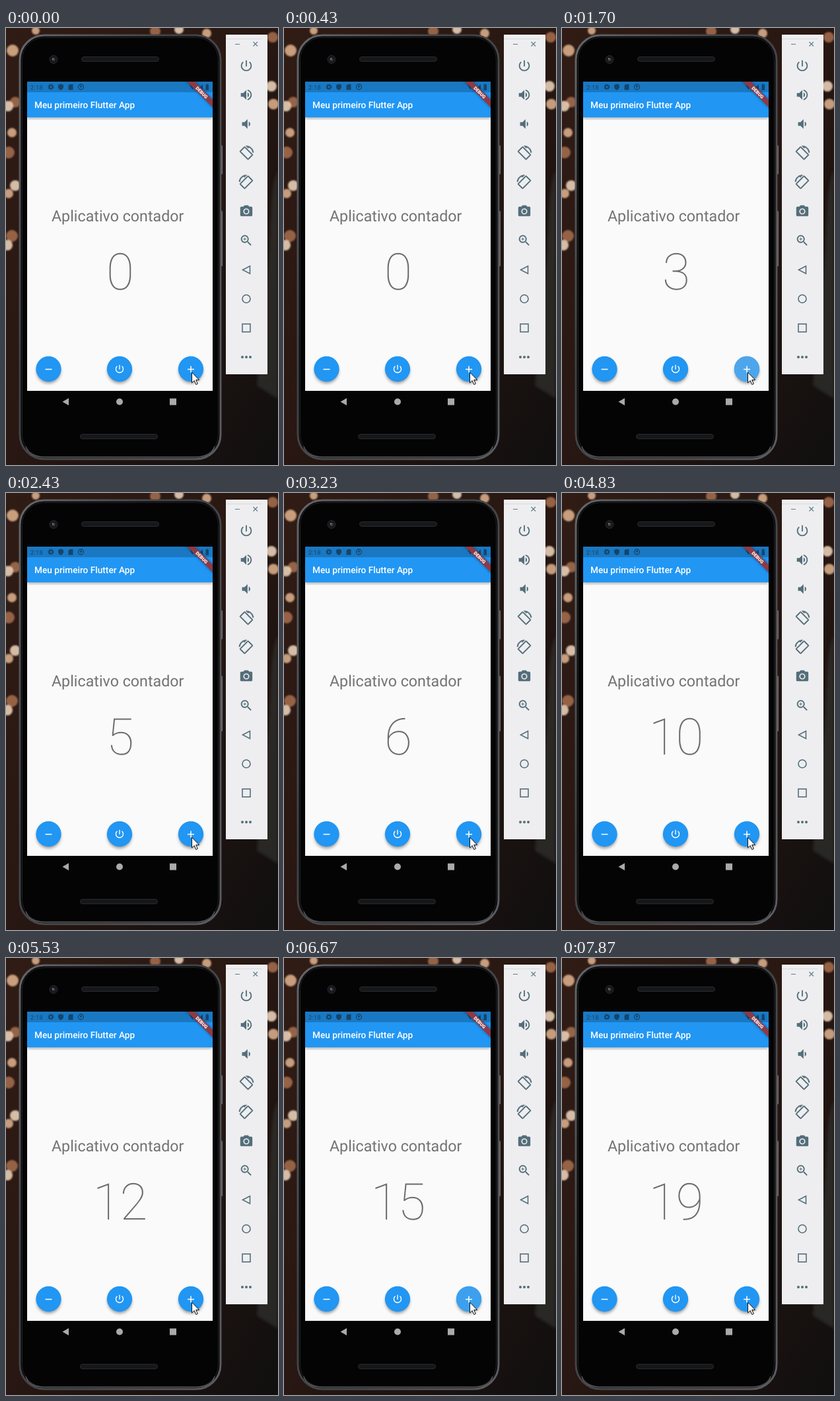
These frames come from a looping animation (412x660 px, 8 s). An HTML page:

```html
<!DOCTYPE html>
<html lang="pt">
<head>
<meta charset="utf-8">
<style>
  html, body { margin: 0; width: 100%; height: 100%; overflow: hidden; background: #16100e; }
  svg { display: block; width: 412px; height: 660px; font-family: Roboto, sans-serif; }
  text { text-rendering: geometricPrecision; }
</style>
</head>
<body>
<svg viewBox="0 0 412 660">
  <defs>
    <filter id="blur" x="-50%" y="-50%" width="200%" height="200%"><feGaussianBlur stdDeviation="2"/></filter>
    <filter id="soft" x="-50%" y="-50%" width="200%" height="200%"><feGaussianBlur stdDeviation="1.2"/></filter>
    <linearGradient id="rim" x2="1" y2="1">
      <stop offset="0" stop-color="#66676b"/><stop offset=".4" stop-color="#3f4044"/><stop offset="1" stop-color="#5c5d61"/>
    </linearGradient>
    <linearGradient id="night" x2="1" y2="1">
      <stop offset="0" stop-color="#301c15"/><stop offset=".5" stop-color="#281712"/><stop offset="1" stop-color="#100f0f"/>
    </linearGradient>
    <clipPath id="screen"><rect x="32" y="81" width="281" height="467"/></clipPath>
    <path id="power" d="M13 3h-2v10h2V3zm4.83 2.17l-1.42 1.42C17.99 7.86 19 9.81 19 12c0 3.87-3.13 7-7 7s-7-3.13-7-7c0-2.19 1.01-4.14 2.58-5.42L6.17 5.17C4.23 6.82 3 9.26 3 12c0 4.97 4.03 9 9 9s9-4.03 9-9c0-2.74-1.23-5.18-3.17-6.83z"/>
    <path id="loud" d="M3 9v6h4l5 5V4L7 9H3zm13.5 3c0-1.77-1.02-3.29-2.5-4.03v8.05c1.48-.73 2.5-2.25 2.5-4.02zM14 3.23v2.06c2.89.86 5 3.54 5 6.71s-2.11 5.85-5 6.71v2.06c4.01-.91 7-4.49 7-8.77s-2.99-7.86-7-8.77z"/>
    <path id="quiet" d="M18.5 12c0-1.77-1.02-3.29-2.5-4.03v8.05c1.48-.73 2.5-2.25 2.5-4.02zM5 9v6h4l5 5V4L9 9H5z"/>
    <path id="turn" stroke="#546e7a" stroke-width=".8" d="M16.48 2.52c3.27 1.55 5.61 4.72 5.97 8.48h1.5C23.44 4.84 18.29 0 12 0l-.66.03 3.81 3.81 1.33-1.32zM10.23 1.75c-.59-.59-1.54-.59-2.12 0L1.75 8.11c-.59.59-.59 1.54 0 2.12l12.02 12.02c.59.59 1.54.59 2.12 0l6.36-6.36c.59-.59.59-1.54 0-2.12L10.23 1.75zm4.6 19.44L2.81 9.17l6.36-6.36 12.02 12.02-6.36 6.36z"/>
    <path id="camera" fill-rule="evenodd" d="M9 2L7.17 4H4c-1.1 0-2 .9-2 2v12c0 1.1.9 2 2 2h16c1.1 0 2-.9 2-2V6c0-1.1-.9-2-2-2h-3.17L15 2H9zm3 15a5 5 0 1 1 0-10a5 5 0 1 1 0 10zm0-1.8a3.2 3.2 0 1 0 0-6.4a3.2 3.2 0 1 0 0 6.4z"/>
    <path id="zoom" d="M15.5 14h-.79l-.28-.27C15.41 12.59 16 11.11 16 9.5 16 5.91 13.09 3 9.5 3S3 5.91 3 9.5 5.91 16 9.5 16c1.61 0 3.09-.59 4.23-1.57l.27.28v.79l5 4.99L20.49 19l-4.99-5zm-6 0C7.01 14 5 11.99 5 9.5S7.01 5 9.5 5 14 7.01 14 9.5 11.99 14 9.5 14zm2.5-4h-2v2H9v-2H7V9h2V7h1v2h2v1z"/>
  </defs>

  <rect width="412" height="660" fill="url(#night)"/>
  <g id="lights" filter="url(#soft)"></g>
  <path d="M412 215C396 245 404 330 392 400L380 540L412 560Z" fill="#33302f" opacity=".7" filter="url(#blur)"/>

  <!-- phone -->
  <g fill="#6f7074">
    <rect x="324" y="177" width="4" height="44" rx="1.5"/><rect x="324" y="276" width="4" height="84" rx="1.5"/>
  </g>
  <rect x="21" y="11" width="304" height="640" rx="37" fill="#070708" stroke="url(#rim)" stroke-width="3"/>
  <rect x="24.500" y="14.500" width="297" height="633" rx="33" fill="#040405" stroke="#222325"/>
  <path d="M30 632Q35 648 59 648H287Q311 648 316 632" fill="none" stroke="#55565a" stroke-width="1.500"/>
  <g fill="#161719" stroke="#292a2d">
    <rect x="114.500" y="43.500" width="117" height="7" rx="3.500"/>
    <rect x="112.500" y="613.500" width="117" height="7" rx="3.500"/>
    <circle cx="72" cy="47.500" r="6"/>
  </g>
  <circle cx="72" cy="47.500" r="2.500" fill="#3c3d44"/><circle cx="71" cy="46.500" r="1" fill="#8d8e96"/>

  <g clip-path="url(#screen)">
    <rect x="32" y="81" width="281" height="467" fill="#fafafa"/>
    <rect x="32" y="133" width="281" height="4" fill="#555" opacity=".5" filter="url(#blur)"/>
    <rect x="32" y="97" width="281" height="38" fill="#2196f3"/>
    <rect x="32" y="81" width="281" height="16" fill="#1a78c2"/>
    <g fill="#14456c">
      <text x="37" y="92.500" font-size="9.200" letter-spacing=".3">2:18</text>
      <circle cx="68" cy="89" r="2.600" fill="none" stroke="#14456c" stroke-width="2"/>
      <circle cx="68" cy="89" r="4" fill="none" stroke="#14456c" stroke-width="1.200" stroke-dasharray="1.600 1.540"/>
      <path d="M83 84.500l4 1.500v3q0 3-4 5q-4-2-4-5v-3zM96.500 85h5v8.500h-7V87z"/>
      <circle cx="113.500" cy="89" r="4" fill="none" stroke="#14456c" stroke-width="1.300"/>
      <path d="M111.500 87h4l-2 4zM278 86h9l-4.500 7zM290 93h8v-8zM302.500 85.500h1v-1h2v1h1.500V94h-4.500z"/>
    </g>
    <text x="43" y="121" font-size="13.670" font-weight="500" fill="#fff">Meu primeiro Flutter App</text>
    <g transform="translate(296.500 97.500) rotate(45)">
      <rect x="-30" y="-4.100" width="60" height="8.200" opacity=".4" filter="url(#blur)"/>
      <rect x="-30" y="-4.100" width="60" height="8.200" fill="#8c3a47"/>
      <text y="2.500" font-size="7" font-weight="900" text-anchor="middle" fill="#fff">DEBUG</text>
    </g>
    <text x="169.200" y="291.500" font-size="23.250" text-anchor="middle" fill="#737373">Aplicativo contador</text>
    <text id="count" x="172.500" y="394.700" font-size="76.600" font-weight="100" letter-spacing="-1" text-anchor="middle" fill="#6b6b6b"></text>
    <g id="buttons"></g>
    <path d="M59.500 515.500h10M275 515.500h10M280 510.500v10" stroke="#fff" stroke-width="1.500"/>
    <use href="#power" fill="#fff" transform="translate(163.700 506.700) scale(.69)"/>
  </g>

  <g fill="#aaa">
    <path d="M95 559v11l-9.500-5.500z"/><circle cx="172" cy="564.500" r="5"/><rect x="248" y="559.500" width="10" height="10"/>
  </g>

  <!-- emulator toolbar -->
  <rect x="333" y="10" width="63" height="513" fill="#eeeef0"/>
  <path d="M333 16.500h55" stroke="#dcd6d8"/>
  <path d="M347 24.500h7M374.500 21l6.500 6.500M381 21l-6.500 6.500" stroke="#607d8b" stroke-width="1.200"/>
  <g id="tools" fill="#546e7a"></g>
  <g fill="none" stroke="#546e7a" stroke-width="1.600">
    <path d="M369.500 359.500v11.500l-11-5.750z"/><circle cx="364" cy="409" r="6"/><rect x="358" y="447" width="12" height="12"/>
  </g>
  <path d="M358 497h.01M364 497h.01M370 497h.01" stroke="#546e7a" stroke-width="4" stroke-linecap="round"/>

  <path d="M281.500 520v16l3.700-3.500l2.600 6l2.500-1.100l-2.600-5.900h5z" fill="#fff" stroke="#111" stroke-width="1"/>
</svg>
<script>
const $ = id => document.getElementById(id);

// x, y, radius of the blurred street lights
const lights = [[10, 34, 9], [14, 112, 8], [3, 118, 8], [9, 158, 7], [4, 188, 9], [14, 238, 8], [4, 250, 7],
  [9, 314, 9], [2, 328, 8], [45, 4, 6], [226, 5, 8], [262, 2, 7], [304, 8, 7], [404, 14, 8], [402, 88, 8], [405, 115, 8]];
$('lights').innerHTML = lights.map(([x, y, r], i) =>
  `<circle cx="${x}" cy="${y}" r="${r}" fill="${['#e3b58f', '#a9704f', '#f3d9c0'][i % 3]}" opacity=".85"/>`).join('');

$('buttons').innerHTML = [64.5, 172, 280].map(x => `
  <circle cx="${x}" cy="518.500" r="18.500" fill="#444" opacity=".5" filter="url(#blur)"/>
  <circle cx="${x}" cy="515" r="19.150" fill="#2196f3"/>`).join('') +
  '<circle id="splash" cx="280" cy="515" r="19.150" fill="#4da6ec"/>';

const tools = [['power'], ['loud'], ['quiet'], ['turn'], ['turn', -1], ['camera'], ['zoom']];
$('tools').innerHTML = tools.map(([id, flip = 1], i) =>
  `<use href="#${id}" transform="translate(364 ${57 + 44 * i}) scale(${.92 * flip} .92) translate(-12 -12)"/>`).join('');

// press and release times; the counter rises on release
const taps = [[730, 850], [1130, 1250], [1370, 1570], [1640, 2030], [2330, 2430], [2770, 2870], [3330, 3430],
  [3700, 3970], [4200, 4430], [4610, 4710], [4890, 4990], [5170, 5270], [5700, 5930], [6150, 6250],
  [6400, 6600], [6640, 6830], [6870, 7070], [7130, 7630], [7670, 7870]];

function draw() {
  const t = performance.now() % 8000;
  const held = taps.find(([down, up]) => t >= down && t < up);
  $('count').textContent = taps.filter(([, up]) => up <= t).length;
  $('splash').setAttribute('opacity', held ? Math.min(1, (t - held[0]) / 50) : 0);
  requestAnimationFrame(draw);
}
draw();
</script>
</body>
</html>
```
